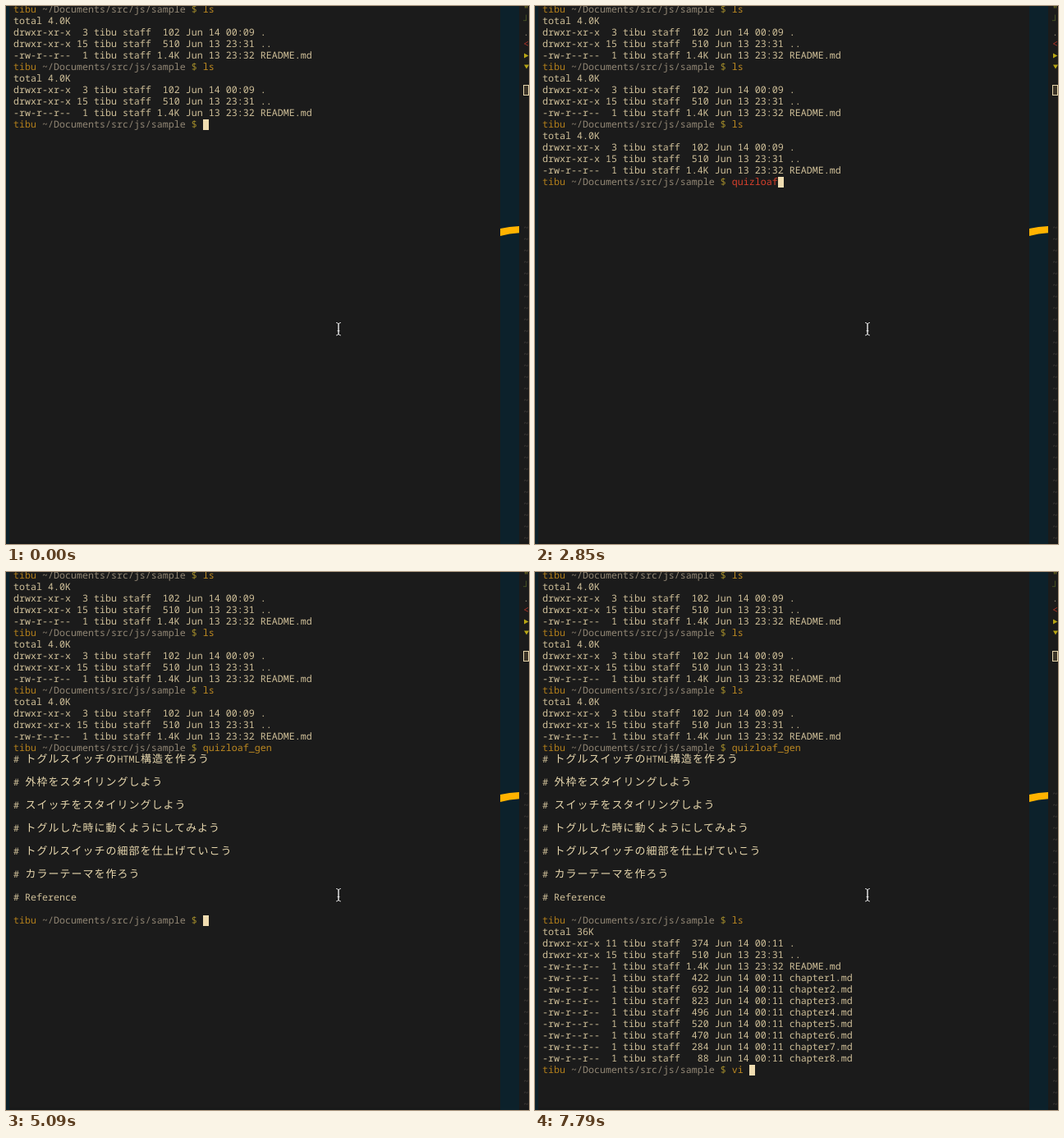
Animation of 637 by 655 pixels, one loop 8 s. Source, as an HTML page:

```html
<!DOCTYPE html>
<html lang="ja">
<head>
<meta charset="utf-8">
<title>Terminal session</title>
<style>
  html, body { margin: 0; width: 100%; height: 100%; overflow: hidden; background: #1b1b1b; }
  svg { display: block; width: 637px; height: 655px; }
  text { font: 11.667px "Roboto Mono", "Noto Sans Mono", monospace; white-space: pre; fill: #cfbf98; text-rendering: geometricPrecision; }
  .user { fill: #b17e1b; }
  .path { fill: #918674; }
  .sign { fill: #a08a2a; }
  .known { fill: #bd8921; }
  .unknown { fill: #d8402c; }
  .wide { font-family: "Noto Sans CJK JP", "Noto Sans CJK", sans-serif; font-size: 13px; letter-spacing: 1px; fill: #e8d8ae; }
</style>
</head>
<body>
<svg viewBox="0 0 637 655">
  <rect width="637" height="655" fill="#1b1b1b"/>
  <rect y="652" width="637" height="3" fill="#181919"/>
  <rect width="4" height="655" fill="#0c212b"/>
  <rect x="602" width="23" height="655" fill="#0c212b"/>
  <path d="M602 271Q613 268.3 625 268V276.3Q613 277 602 280Z" fill="#ffb300"/>
  <g id="side"></g>
  <g id="lines"></g>
  <rect id="cursor" width="7" height="13" fill="#efdcb0"/>
  <g fill="none" stroke-linecap="round">
    <path id="beam" d="M402.5 385.5Q405 385.5 405 388V398.5Q405 401 402.5 401M407.5 385.5Q405 385.5 405 388V398.5Q405 401 407.5 401M404 395.5H406" stroke="#111" stroke-width="2.2"/>
    <path id="beamCore" stroke="#e4e4e4" stroke-width="1"/>
  </g>
</svg>
<script>
const LOOP = 8000, CELL = 7, ROW = 14, LEFT = 9, PROMPT_COLS = 33;
const USER = 'tibu', COMMAND = 'quizloaf_gen';
const $ = id => document.getElementById(id);

const span = (cls, text) => `<tspan class="${cls}">${text}</tspan>`;
const line = (row, body) => `<text x="${LEFT}" y="${row * ROW + 8}">${body}</text>`;
const prompt = (row, typed = '', cls = 'known') => line(row,
  span('user', USER) + span('path', ' ~/Documents/src/js/sample ') + span('sign', '$ ') + span(cls, typed));

const entry = (perm, links, size, date, name) =>
  `${perm} ${String(links).padStart(2)} ${USER} staff ${String(size).padStart(4)} Jun ${date} ${name}`;
const file = (size, date, name) => entry('-rw-r--r--', 1, size, date, name);
const folder = (links, size, date, name) => entry('drwxr-xr-x', links, size, date, name);
const parent = folder(15, 510, '13 23:31', '..');
const readme = file('1.4K', '13 23:32', 'README.md');

const shortList = ['total 4.0K', folder(3, 102, '14 00:09', '.'), parent, readme];
const longList = ['total 36K', folder(11, 374, '14 00:11', '.'), parent, readme,
  ...[422, 692, 823, 496, 520, 470, 284, 88].map((size, i) => file(size, '14 00:11', `chapter${i + 1}.md`))];
const headings = [
  'トグルスイッチのHTML構造を作ろう', '外枠をスタイリングしよう', 'スイッチをスタイリングしよう',
  'トグルした時に動くようにしてみよう', 'トグルスイッチの細部を仕上げていこう', 'カラーテーマを作ろう', 'Reference'];

const block = (row, rows) => rows.map((text, i) => line(row + i, text)).join('');
const listing = (row, rows) => prompt(row, 'ls') + block(row + 1, rows);
// Full-width glyphs are centred in their two cells.
const wide = run => `<tspan class="wide" dx="0.5">${run}</tspan>`;
const heading = (text, i) => line(16 + 2 * i, '# ' + text.replace(/[^\x00-\x7f]+/g, wide));
const outline = count => headings.slice(0, count).map(heading).join('');

const steps = [];
let done = listing(0, shortList) + listing(5, shortList);
const show = (time, body, row, col) => steps.push({ time, body: done + body, row, col });
const type = (time, row, typed, cls) =>
  show(time, prompt(row, typed, cls), row, PROMPT_COLS + typed.length);

type(0, 10, '');
type(150, 10, 'l');
type(450, 10, 'ls');
done += listing(10, shortList);
show(750, '', 15, 0);
type(900, 15, '');
for (const [time, length] of [[2100, 1], [2250, 2], [2400, 4], [2700, 6], [2850, 8], [3450, 9], [3750, 11]])
  type(time, 15, COMMAND.slice(0, length), 'unknown');
type(3900, 15, COMMAND);
done += prompt(15, COMMAND);
show(4790, '', 16, 0);
show(4940, outline(4), 24, 0);
done += outline(7);
type(5090, 30, '');
type(6290, 30, 'ls');
done += listing(30, longList);
type(6590, 43, '');
type(7640, 43, 'v');
type(7790, 43, 'vi ');

// The neighbouring editor pane shows only its first column.
const sideText = (row, text, fill) =>
  `<text x="630" y="${row * ROW + 8}" style="fill:${fill}">${text}</text>`;
$('side').innerHTML =
  sideText(0, '"', '#8f8a22') + sideText(1, '┘', '#4e5a25') + sideText(2, '.', '#8b806d') +
  sideText(3, '&lt;', '#b03428') +
  '<path d="M631 57.5L636.5 60.5L631 63.5ZM631 71.5H637L634 76.5Z" fill="#b8a514"/>' +
  '<rect x="630.5" y="96.5" width="6" height="12" fill="#3a3328" stroke="#e6d5aa"/>' +
  Array.from({ length: 28 }, (_, i) => sideText(19 + i, '~', '#403c38')).join('');
$('beamCore').setAttribute('d', $('beam').getAttribute('d'));

let current;
function draw(time) {
  const step = steps.findLast(s => s.time <= time % LOOP);
  if (step !== current) {
    current = step;
    $('lines').innerHTML = step.body;
    $('cursor').setAttribute('x', LEFT + step.col * CELL);
    $('cursor').setAttribute('y', step.row * ROW - 2);
  }
}

const start = performance.now();
function tick() {
  draw(performance.now() - start);
  requestAnimationFrame(tick);
}
tick();
</script>
</body>
</html>
```
